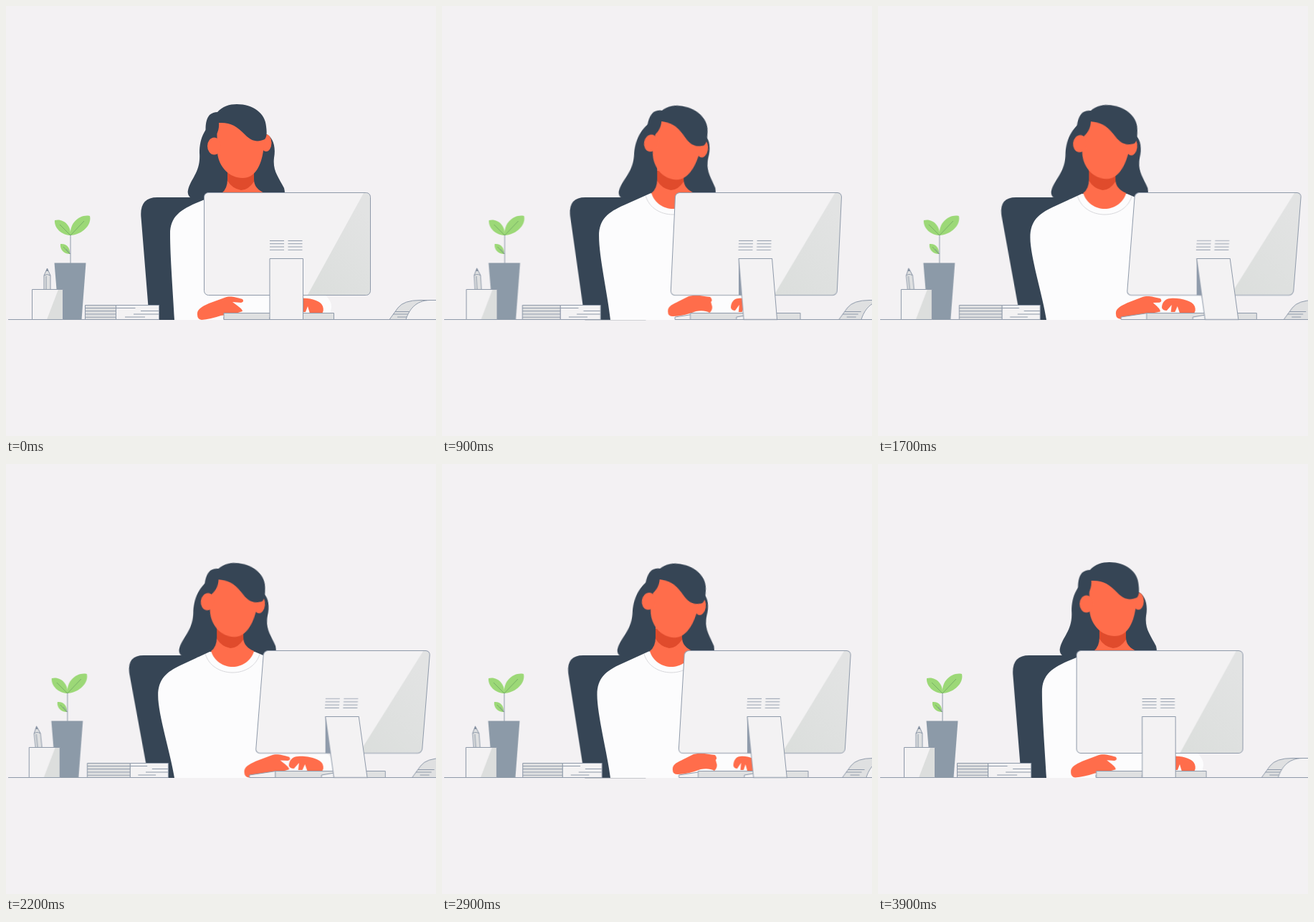
An HTML page without scripts that plays this animation: 600 by 600 pixels, repeating every 4000 ms.

```html
<!DOCTYPE html>
<html lang="en">
<head>
<meta charset="utf-8">
<title>At the desk</title>
<style>
  html, body { margin: 0; width: 100%; height: 100%; overflow: hidden; background: #f3f1f3; }
  svg { display: block; width: 100vw; height: 100vh; }

  /* The view drifts to one side and back; nearer parts travel further. */
  :root { --glide: cubic-bezier(.33, 0, .41, 1); }
  .move, .shirt, .nod, .sway, .fingers, .tap { animation: move 2s var(--glide) infinite alternate; }
  @keyframes move { to { transform: var(--to); } }

  .nod { --peak: translate(2px, 2px) rotate(10deg); --to: translate(1px, 1px) rotate(6.8deg); transform-origin: 330px 240px; }
  .sway { --peak: skewX(-5.5deg); --to: skewX(-3.7deg); transform-origin: 0 262px; }
  .nod, .sway { animation-name: nod; }
  @keyframes nod {
    42% { transform: var(--peak); }
    to { transform: var(--to); }
  }

  .reach { --to: translate(66px, 0); animation-timing-function: cubic-bezier(.15, 0, .29, 1); }
  .fingers {
    --open: path('M267 431C266 424 272 420 283 415L305 407C313 404 318 406 330 409Q333 413 328 414L316 413C322 418 330 422 330 426Q320 430 300 432Q285 437 273 438Q267 437 267 431Z');
    --closed: path('M267 427C266 419 274 416 282 412L296 405C308 402 316 405 326 406Q330 410 327 413L328 417C330 421 328 426 325 428Q318 424 306 426Q288 433 274 433Q267 433 267 427Z');
    animation-name: type;
  }
  @keyframes type {
    from, to { d: var(--open); }
    30%, 65% { d: var(--closed); }
  }
  .tap { transform-origin: 443px 0; animation-name: tap; }
  @keyframes tap {
    40% { transform: none; }
    60% { transform: scaleX(.88); }
    to { transform: scaleX(1.2); }
  }

  .shirt {
    fill: #fcfcfd;
    --from: path('M235 438C233 400 229 350 229 318C229 294 243 284 270 273L301 260H361L400 280C430 290 450 350 446 404Q458 415 452 428V438Z');
    --lean: path('M235 438C230 405 212 350 212 323C212 300 224 290 243 281L284 262H347L390 280C430 290 450 350 448 404Q460 415 456 428V438Z');
    animation-name: lean;
  }
  @keyframes lean {
    from { d: var(--from); }
    to { d: var(--lean); }
  }

  .line { fill: none; }
  .line, .edge { stroke: #8e99a9; stroke-width: 1; stroke-linejoin: round; vector-effect: non-scaling-stroke; }
  .skin { fill: #ff6d4b; }
  .dark { fill: #364555; }
  .pale { fill: #f3f2f3; }
  .grey { fill: #dfe0e1; }
  .rules { fill: url(#rules); }
</style>
</head>
<body>
<svg viewBox="0 0 600 600">
  <defs>
    <linearGradient id="shine" x1="0" y1="1" x2=".6" y2="0">
      <stop offset="0" stop-color="#dbdedc"/>
      <stop offset="1" stop-color="#e2e3e3"/>
    </linearGradient>
    <pattern id="rules" y="327" width="600" height="4.27" patternUnits="userSpaceOnUse">
      <rect width="600" height="1" fill="#8e99a9"/>
    </pattern>
  </defs>

  <path class="line" d="M3 437.5H600"/>

  <!-- Chair -->
  <path class="dark move" d="M200 438L188.500 295Q186 267 211 267H285V438Z"
    style="--to: translate(-1px, 0) skewX(6deg); transform-origin: 0 438px"/>

  <!-- Woman -->
  <g class="move" style="--to: translate(-12.5px, 0)">
    <path class="dark sway" d="M300 155C277 166 270 185 270 205C272 232 258 240 254 257Q252 266 262 270H385Q391 266 388 254C380 238 372 230 374 212C377 195 372 182 362 178L340 160Z"/>
  </g>
  <path class="shirt"/>
  <g class="move" style="--to: translate(-15px, 0)">
    <path fill="none" stroke="#d6d6da" d="M293 265C298 282 314 291 331 291S364 282 369 265"/>
    <path class="skin" d="M309 225V242Q309 255 301 261C305 275 318 283 331 283S357 275 361 261Q346 255 346 242V225Z"/>
    <path fill="#e04b2c" d="M309 230H346V245Q338 257 328 257Q316 255 309 244Z"/>
  </g>
  <g class="move" style="--to: translate(-16px, 0)">
    <g class="nod">
      <ellipse class="skin" cx="363" cy="191" rx="7.5" ry="12"/>
      <path class="skin" d="M294 160L295 205C297 225 312 240 330 240C348 240 356 222 359 202L362 180L350 155Z"/>
      <path class="dark move" style="--to: translate(5px, 0)" d="M280 190C278 175 277 160 284 152Q289 148 295 148C302 140 312 137 322 137C345 137 362 150 363 168Q365 182 361 186C350 191 342 188 334 180C322 167 312 162 297 163C298 174 293 184 284 189Z"/>
      <ellipse class="skin" cx="290.5" cy="195.5" rx="9.5" ry="12"/>
    </g>
  </g>
  <g class="move reach">
    <path class="skin fingers"/>
  </g>
  <path class="skin tap" d="M402 421C402 414 406 408 413 408C424 407 439 411 442 419Q444 425 441 429H424L421 419L418 427H413L414 417L408 425Q403 425 402 421Z"/>

  <!-- Keyboard -->
  <path class="pale edge move" d="M304 437.5V434L341 428.5V437.5Z" style="--to: translate(36px, 0)"/>
  <rect class="grey edge move" x="304" y="428.5" width="153.5" height="9" style="--to: translate(72.5px, 0)"/>

  <!-- Monitor -->
  <g class="move" style="--to: translate(72.5px, 0) skewX(-4.6deg); transform-origin: 0 404px">
    <rect class="pale" x="276.5" y="260.5" width="232" height="143" rx="6"/>
    <path fill="url(#shine)" d="M499 261H502.500Q508.500 261 508.500 267V397Q508.500 403 502 403H421Z"/>
    <rect class="line" x="276.5" y="260.5" width="232" height="143" rx="6"/>
    <rect class="rules" x="368" y="327" width="20" height="14"/>
    <rect class="rules" x="393.5" y="327" width="20" height="14"/>
  </g>
  <rect class="move" fill="#8f9bab" x="368" y="352.5" width="12" height="51" style="--to: translate(78.5px, 0)"/>
  <path class="pale edge move" d="M368 437.5V434L386 431V437.5Z" style="--to: translate(73px, 0)"/>
  <rect class="pale edge move" x="368" y="352.5" width="46.5" height="85"
    style="--to: translate(90.5px, 0) skewX(8deg); transform-origin: 0 437.5px"/>

  <!-- Papers -->
  <g class="move" style="--to: translate(32px, 0)">
    <path class="grey edge" d="M535 437.5L547 421Q555 410.500 578 410.500H640V437.500Z"/>
    <path class="line" d="M543 426.5H566M540 430H562M546 434H559"/>
  </g>
  <path class="pale edge move" d="M558 437.5C562 425 571 410.500 592 410.500H660V437.500Z" style="--to: translate(46px, 0)"/>

  <!-- Plant -->
  <g class="move" style="--to: translate(-4.3px, 0)">
    <g fill="#9cd877">
      <path d="M90 320C78 320 67 310 68 299C80 296 91 306 90 320Z"/>
      <path d="M90 320C88 304 102 290 117 293C120 306 106 319 90 320Z"/>
      <path d="M89 346C81 346 75 340 76 332C84 331 90 337 89 346Z"/>
    </g>
    <path class="line" d="M90 359V319M90 346L84 339"/>
    <path fill="none" stroke="#6fa562" stroke-width=".8" d="M90 320L75 305M90 320L109 300M89 346L80 336"/>
    <path fill="#8c9aa8" d="M67.500 358.500H111.500L105.500 437.500H74Z"/>
  </g>

  <!-- Pencil cup -->
  <g class="move" style="--to: translate(-12px, 0) skewX(6deg); transform-origin: 0 395px">
    <path class="grey edge" d="M53 396V376L57.500 366L62 376V396ZM53 376Q57.500 373 62 376M56 396V377"/>
    <path fill="#7f8b9b" d="M57.500 366L55.800 370H59.200Z"/>
  </g>
  <g class="move" style="--to: translate(-4.3px, 0)">
    <rect class="pale" x="36.5" y="395.5" width="43" height="42"/>
    <path fill="#dcdedd" d="M73 395.500H79.500V437.500H57Z"/>
    <rect class="line" x="36.5" y="395.5" width="43" height="42"/>
  </g>

  <!-- Books -->
  <g class="move" style="--to: translate(3px, 0) scaleX(1.4); transform-origin: 110.5px 0">
    <rect class="grey edge" x="110.5" y="417.5" width="43" height="20"/>
    <rect class="rules" x="110.5" y="420" width="43" height="15"/>
  </g>
  <g class="move" style="--to: translate(20px, 0) scaleX(.883); transform-origin: 153.5px 0">
    <rect class="pale edge" x="153.5" y="417.5" width="60" height="20"/>
    <path class="line" d="M153.500 421.500h27M188 425.500h25M178 430h35M166 434h28"/>
  </g>
</svg>
</body>
</html>
```
